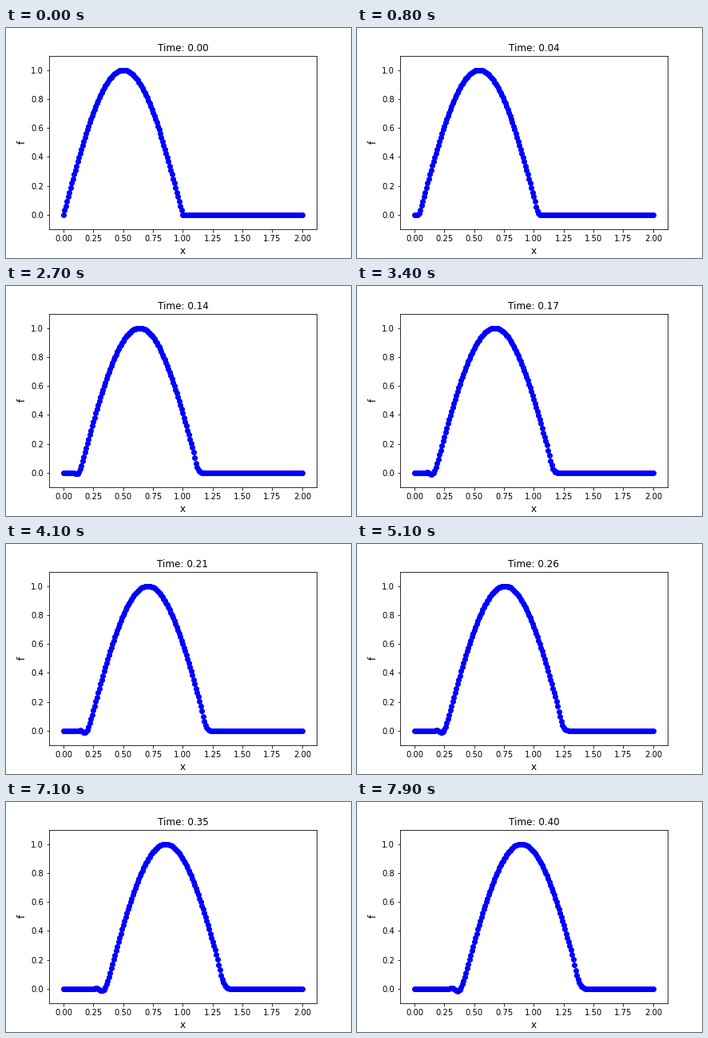
These frames come from a looping animation (432x288 px, 8 s). A matplotlib script:

```python
import numpy as np
import matplotlib.pyplot as plt
from matplotlib.animation import FuncAnimation

FRAMES = 80
DX, DT, SPEED = 0.01, 0.005, 1.0

x = np.linspace(0, 2, 201)


def lax_wendroff(f, c):
    """One step of linear advection with Courant number c."""
    new = f.copy()
    left, mid, right = f[:-2], f[1:-1], f[2:]
    new[1:-1] = (mid - c / 2 * (right - left)
                 + c * c / 2 * (right - 2 * mid + left))
    return new


def solve():
    f = np.where(x <= 1, np.sin(np.pi * x), 0.0)
    states = [f]
    for _ in range(FRAMES - 1):
        states.append(lax_wendroff(states[-1], SPEED * DT / DX))
    return states


states = solve()

plt.rcParams["font.family"] = "DejaVu Sans"
fig, ax = plt.subplots(figsize=(6, 4), dpi=72)
fig.subplots_adjust(left=0.125, right=0.9, bottom=0.125, top=0.88)
ax.set_xlim(-0.12, 2.12)
ax.set_ylim(-0.1, 1.1)
ax.set_xlabel("x", fontsize=12)
ax.set_ylabel("f", fontsize=12)
wave, = ax.plot(x, states[0], "bo")
title = ax.set_title("Time: 0.00", fontsize=12)


def update(i):
    wave.set_ydata(states[i])
    title.set_text(f"Time: {i * DT:.2f}")
    return wave, title


anim = FuncAnimation(fig, update, frames=FRAMES, interval=100,
                     repeat=True, repeat_delay=0)
plt.show()
```
